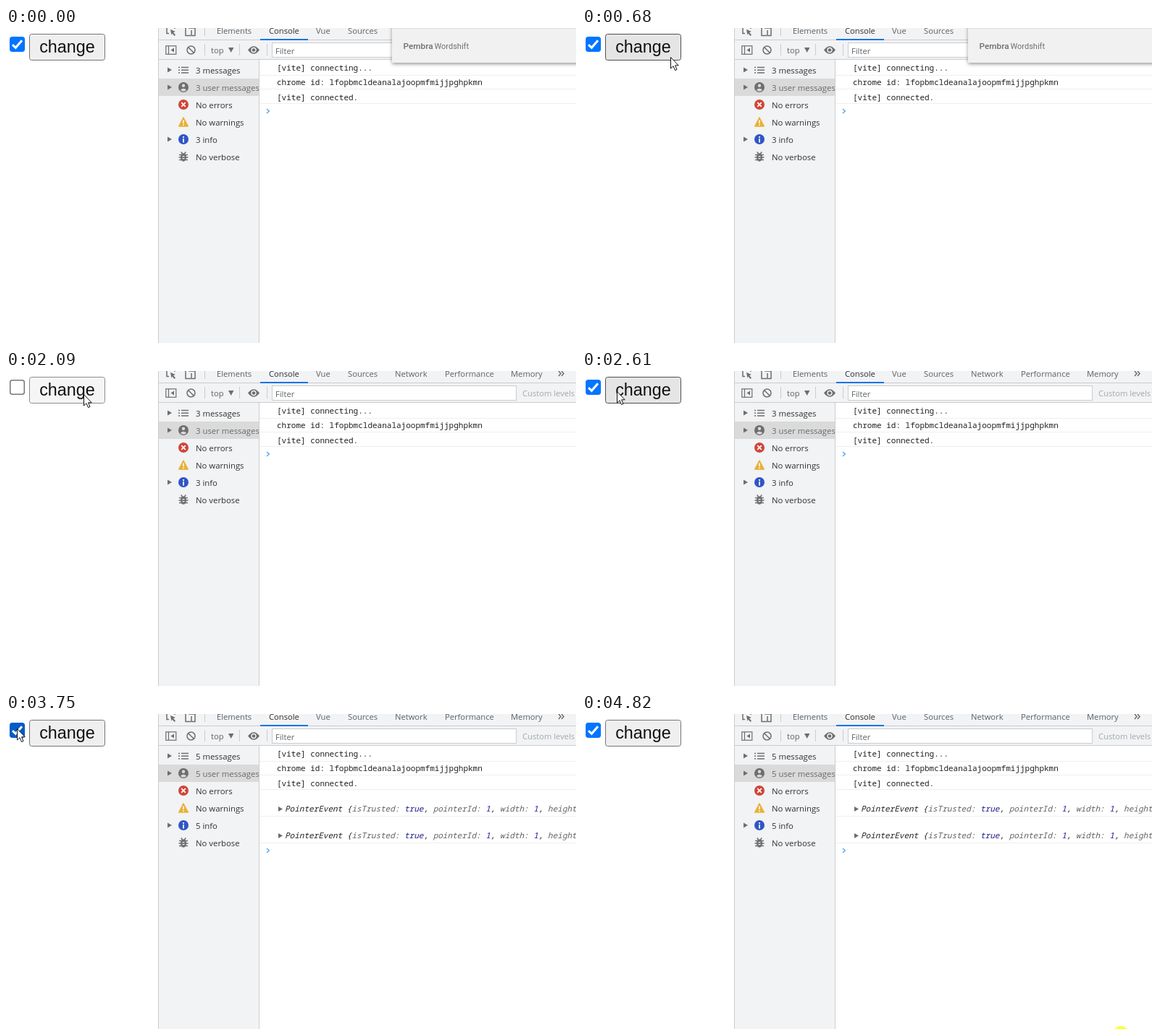
These frames come from a looping animation (787 by 436 pixels, 4880 ms). An HTML page:

```html
<!DOCTYPE html>
<html lang="en">
<head>
<meta charset="utf-8">
<title>Checkbox and console</title>
<style>
  html, body { margin: 0; width: 100%; height: 100%; overflow: hidden; background: #fff; }
  svg { display: block; }
  text { white-space: pre; }
  .ui { font-family: "Open Sans", "Noto Sans", sans-serif; font-size: 11.2px; fill: #5f6368; }
  .side { font-size: 11.35px; fill: #303134; }
  .mono { font-family: "Noto Sans Mono", "DejaVu Sans Mono", monospace; font-size: 11px; fill: #222; }
  .log { font-style: italic; }
  .key { fill: #626262; }
  .val { fill: #1c1c8c; }
  .line { stroke: #cacdd1; fill: none; }
  .rule { stroke: #efefef; }
  .icon { stroke: #6e6e6e; fill: none; stroke-width: 1.5; }
  .solid { fill: #6e6e6e; }
  .prompt { stroke: #55a7ee; fill: none; stroke-width: 1.4; }
</style>
</head>
<body>
<svg width="787" height="436" viewBox="0 0 787 436">
  <defs>
    <clipPath id="sideClip"><rect x="211" y="44" width="138" height="392"/></clipPath>
    <filter id="shadow" x="-10%" y="-30%" width="120%" height="180%">
      <feDropShadow dx="0" dy="2" stdDeviation="2.5" flood-color="#000" flood-opacity=".4"/>
    </filter>
  </defs>
  <rect width="787" height="436" fill="#fff"/>

  <g id="page">
    <rect id="box" x="5.75" y="12.75" width="19.5" height="19.5" rx="3" stroke-width="1.5"/>
    <path id="tick" d="M9 23.2L13.3 27.3L22 17.2" fill="none" stroke="#fff" stroke-width="3"/>
    <rect id="button" x="32.5" y="8.5" width="104" height="36" rx="3"/>
    <text x="46.2" y="34" font-family="Liberation Sans, Arial, sans-serif" font-size="23.33" fill="#111">change</text>
  </g>

  <g id="chrome">
    <rect x="211" width="576" height="44" fill="#f1f3f4"/>
    <rect x="211" y="44" width="138" height="392" fill="#f1f3f4"/>
    <rect x="211" y="70" width="138" height="24" fill="#dadada"/>
    <path class="line" d="M210.5 0V436M349.5 44V436M211 16.5H787M211 43.5H787M274.5 0V11M274.5 22V38M322.5 22V38M360.5 22V38"/>
    <rect x="351" y="15" width="66" height="2" fill="#1a73e8"/>
    <rect class="line" x="367.5" y="20.5" width="337" height="20" style="fill:#fff"/>
    <g class="icon">
      <path d="M222 0V7.5H225M233 0V1"/>
      <path d="M227 2L234 5L231 6L234 9.5L232.5 11L229.5 7.5L228.5 10Z" class="solid" stroke="none"/>
      <path d="M248 0V10.5H255M252 0H261V10.5H256V3"/>
      <rect x="220.8" y="24.8" width="14" height="11.5" stroke-width="1.2"/>
      <path d="M224.5 25V36" stroke-width="1.2"/>
      <path d="M232 27.5V33.5L227.5 30.5Z" class="solid" stroke="none"/>
      <circle cx="255.5" cy="30.5" r="5.5"/>
      <path d="M251.7 26.7L259.3 34.3"/>
      <path d="M334 30.5Q342 20 350 30.5Q342 41 334 30.5Z" class="solid" stroke="none"/>
      <circle cx="342" cy="30.5" r="3" stroke="#f1f3f4" stroke-width="1.4"/>
    </g>
    <path class="solid" d="M307 27H314.5L310.7 34Z"/>
    <path class="icon" d="M763 0L766 3.5L763 7M767 0L770 3.5L767 7" stroke-width="1.2"/>
  </g>

  <g id="sideIcons">
    <path class="solid" d="M223 54.5L229 58L223 61.5ZM223 78.5L229 82L223 85.5ZM223 150.5L229 154L223 157.5Z"/>
    <path class="icon" d="M238 54.5H240M238 58.2H240M238 62H240M242 54.5H252M242 58.2H252M242 62H252"/>
    <circle class="solid" cx="245" cy="82" r="7"/>
    <circle cx="245" cy="79.7" r="2.2" fill="#dadada"/>
    <path d="M240.8 86Q245 81.5 249.2 86Q245 89.5 240.8 86Z" fill="#dadada"/>
    <circle cx="245" cy="106" r="7" fill="#cf4639"/>
    <path d="M242.2 103.2L247.8 108.8M247.8 103.2L242.2 108.8" stroke="#fff" stroke-width="1.7"/>
    <path d="M245 124L251.3 136H238.7Z" fill="#e9b037" stroke="#e9b037" stroke-width="1.5" stroke-linejoin="round"/>
    <path d="M245 127.5V132M245 133.2V135" stroke="#fff" stroke-width="1.6"/>
    <circle cx="245" cy="154" r="7" fill="#2f55c8"/>
    <path d="M245 150V152M245 153V158.5" stroke="#fff" stroke-width="1.8"/>
    <ellipse class="solid" cx="245" cy="179" rx="4" ry="5.8"/>
    <path class="icon" d="M239 175.5H251M238.5 179H251.5M239 182.5H251M241.8 171.5L243.5 174M248.2 171.5L246.5 174"/>
    <path d="M243.5 177.6H246.5M243.5 180.6H246.5" stroke="#f1f3f4" stroke-width="1.2"/>
  </g>
  <g id="labels"></g>
  <g id="side" clip-path="url(#sideClip)"></g>
  <g id="console">
    <path class="rule" d="M350 65.5H787M350 84.5H787M350 104.5H787"/>
  </g>
  <path id="prompt" class="prompt" d="M360 112L363.3 115L360 118"/>

  <g id="popup">
    <rect x="533" y="-20" width="270" height="68" rx="2" fill="#f1f1f1" filter="url(#shadow)"/>
    <path d="M533 .5H787" stroke="#dcdcdc"/>
    <g font-family="Roboto, sans-serif" fill="#6b6f73">
      <text x="548.5" y="29" font-size="11.8" font-weight="500">Pembra</text>
      <text x="591.5" y="29" font-size="11">Wordshift</text>
    </g>
  </g>

  <circle id="spot" cx="744" cy="444" r="12" fill="#ffff32"/>
  <path id="cursor" d="M.5 .5V16L4 12.7L6.5 18.5L9 17.5L6.6 11.8H11.2Z" fill="#fff" stroke="#111"/>
</svg>
<script>
const LOOP = 4880;
const $ = id => document.getElementById(id);

function add(parent, tag, attrs, body = "") {
  const el = document.createElementNS("http://www.w3.org/2000/svg", tag);
  for (const k in attrs) el.setAttribute(k, attrs[k]);
  el.innerHTML = body;
  return $(parent).appendChild(el);
}
const label = (parent, cls, x, y, body) => add(parent, "text", { class: cls, x, y }, body);

[["Elements", 291], ["Console", 363], ["Vue", 428], ["Sources", 472], ["Network", 537],
 ["Performance", 606], ["Memory", 697]].forEach(([name, x]) => {
  const el = label("labels", "ui", x, 8, name);
  if (name === "Console") el.style.fill = "#303134";
});
label("labels", "ui", 283, 35, "top");
label("labels", "ui", 372, 36, "Filter");
label("labels", "ui", 713, 35, "Custom levels").style.fill = "#a5a8ab";

const side = ["# messages", "# user messages", "No errors", "No warnings", "# info", "No verbose"]
  .map((form, i) => ({ form, el: label("side", "ui side", 262, 63 + 24 * i, form) }));
side[1].el.style.fill = "#66686b";

["[vite] connecting...", "chrome id: lfopbmcldeanalajoopmfmijjpghpkmn", "[vite] connected."]
  .forEach((s, i) => label("console", "mono", 374, [59, 79, 100][i], s));

const pair = (k, v) => `<tspan class="key">${k}:</tspan> <tspan class="val">${v}</tspan>, `;
const eventText = "PointerEvent {" + pair("isTrusted", "true") + pair("pointerId", 1) +
  pair("width", 1) + pair("height", 1);
const logs = [0, 36.5].map(dy => {
  const y = Math.round(dy);
  const g = add("console", "g", {});
  g.id = "log" + y;
  label(g.id, "mono log", 385, 135 + y, eventText);
  add(g.id, "path", { class: "solid", d: `M376 ${128 + y}L382 ${131.5 + y}L376 ${135 + y}Z` });
  add(g.id, "path", { class: "rule", d: `M350 ${141.5 + y}H787` });
  return g;
});

const easeOut = p => u => 1 - (1 - u) ** p;
const smooth = u => u * u * (3 - 2 * u);
// start, end, steps, x, y, easing
const moves = [
  [130, 680, 9, 122, 40, easeOut(1.58)],
  [760, 960, 4, 107, 32, easeOut(1.6)],
  [2420, 2610, 4, 48, 28, u => u],
  [2680, 2880, 4, 15, 20, easeOut(1.6)],
  [4010, 4480, 8, 739, 423, smooth],
  [4550, 4620, 2, 744, 444, u => u]
];

function pointer(t) {
  let x = 705, y = 460;
  for (const [t0, t1, n, tx, ty, ease] of moves) {
    if (t < t0) break;
    const k = Math.min(n, Math.floor((t - t0) / (t1 - t0) * (n - 1) + .01) + 1);
    const u = ease(k / n);
    x += (tx - x) * u;
    y += (ty - y) * u;
  }
  return [Math.round(x), Math.round(y)];
}

const during = (t, ...spans) => spans.some(([a, b]) => t >= a && t < b);
const countAt = (t, a, b) => (t >= a) + (t >= b);
const show = (el, on) => el.setAttribute("visibility", on ? "visible" : "hidden");
function paint(id, fill, stroke) {
  $(id).setAttribute("fill", fill);
  $(id).setAttribute("stroke", stroke);
}

function draw(t) {
  const [x, y] = pointer(t);
  const inside = (l, top, r, b) => t >= 130 && x >= l && x < r && y >= top && y < b;
  $("cursor").setAttribute("transform", `translate(${x} ${y})`);
  show($("cursor"), t >= 130 && t < 4620);
  show($("spot"), t >= 4820);

  const state = (down, hover) => down ? 2 : hover ? 1 : 0;
  const edge = ["#767676", "#4f4f4f", "#8d8d8d"];
  const b = state(during(t, [1020, 1090], [2090, 2220]), inside(32, 8, 137, 45));
  paint("button", ["#efefef", "#e5e5e5", "#f5f5f5"][b], edge[b]);

  const c = state(during(t, [3010, 3080], [3560, 3660]), inside(5, 12, 26, 33));
  const checked = !during(t, [1090, 2220], [3080, 3660]);
  const blue = ["#0075ff", "#005cc8", "#3793ff"][c];
  paint("box", checked ? blue : "#fff", checked ? blue : edge[c]);
  show($("tick"), checked);

  const fade = t < 1020 ? 1 : Math.max(0, 1 - (Math.floor((t - 1020) / 70) + 0) / 3);
  $("popup").setAttribute("opacity", fade);

  const rows = countAt(t, 3080, 3660);
  logs.forEach((g, i) => show(g, i < rows));
  $("prompt").setAttribute("transform", `translate(0 ${37 * rows})`);
  const total = 3 + countAt(t, 3160, 3750);
  side.forEach(s => { s.el.textContent = s.form.replace("#", total); });
}

const start = performance.now();
function tick() {
  draw((performance.now() - start) % LOOP);
  requestAnimationFrame(tick);
}
tick();
</script>
</body>
</html>
```
